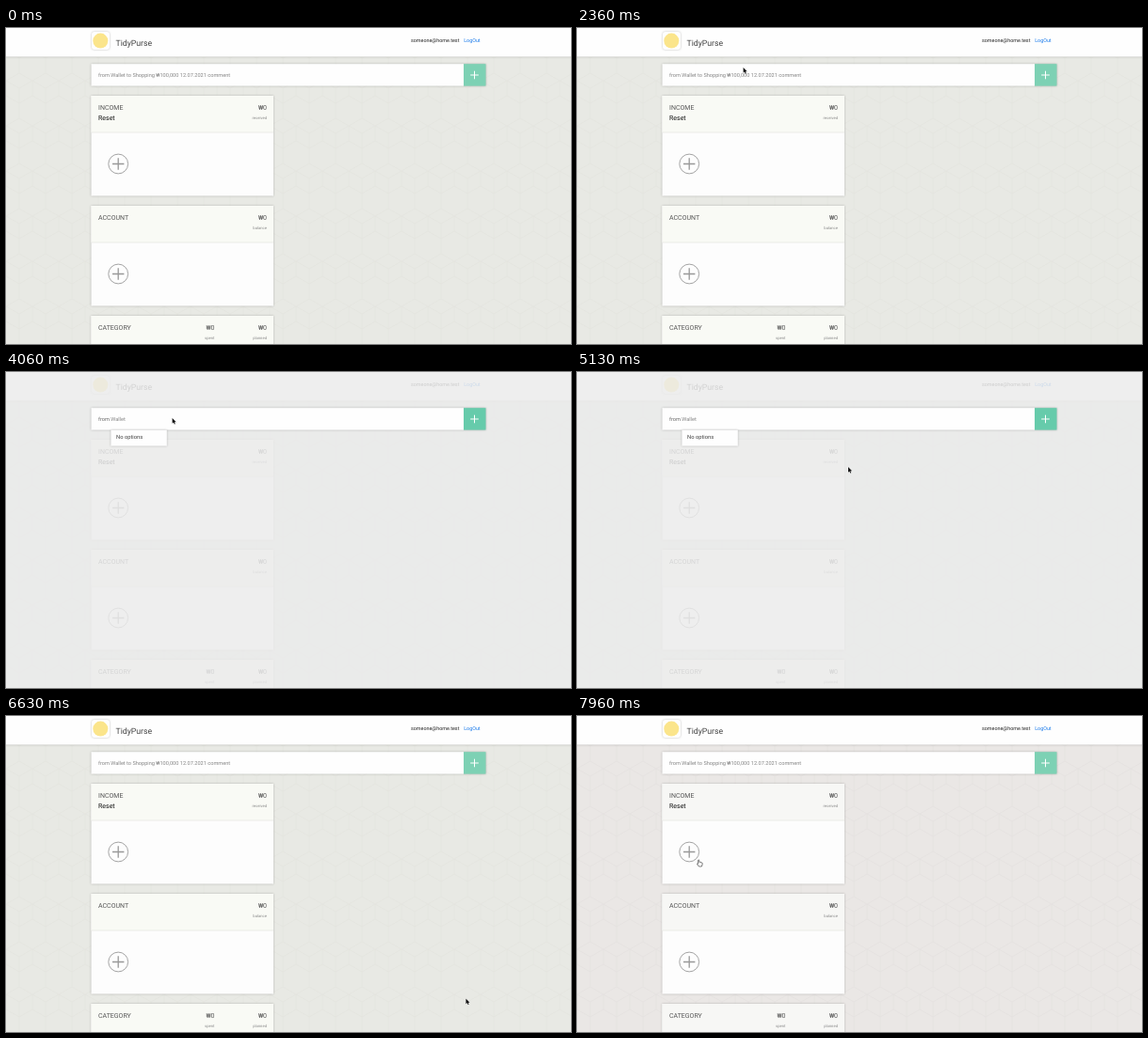
An HTML page that plays this animation: 600x336 px, repeating every 8000 ms.

```html
<!DOCTYPE html>
<html lang="en">
<head>
<meta charset="utf-8">
<title>Budget board</title>
<style>
  html, body { margin: 0; width: 100%; height: 100%; overflow: hidden; }
  svg { display: block; width: 600px; height: 336px; --page: #e8e9e4; --line: #e3e4de; --panel: #f9faf5; }
  svg.warm { --page: #eae7e5; --line: #e4e1df; --panel: #f7f7f5; }
  text { font-family: Roboto, Arial, sans-serif; text-rendering: geometricPrecision; }
  .page { fill: var(--page); }
  .weave { fill: none; stroke: var(--line); stroke-width: .8; }
  .panel { fill: var(--panel); }
  .shadow { filter: drop-shadow(0 .5px 1.3px rgba(0, 0, 0, .25)); }
  .head { font-size: 7px; fill: #555; }
  .note { font-size: 4.2px; fill: #8c8c8c; }
  .field { font-size: 5.6px; fill: #858585; }
  .end { text-anchor: end; }
</style>
</head>
<body>
<svg id="stage" viewBox="0 0 600 336">
  <defs>
    <pattern id="weave" width="28" height="48" patternUnits="userSpaceOnUse">
      <path class="weave" d="M0 8L14 0L28 8V24L14 32L0 24ZM14 32V48M0 8L14 16L28 8M14 16V32"/>
    </pattern>
  </defs>
  <rect class="page" width="600" height="336"/>
  <rect width="600" height="336" fill="url(#weave)"/>

  <g class="shadow">
    <rect x="-5" y="-5" width="610" height="35.5" fill="#fefefe"/>
  </g>
  <rect class="shadow" x="91" y="4" width="19" height="19" rx="3" fill="#fefefe"/>
  <circle cx="100.3" cy="13.6" r="8" fill="#fbe58b"/>
  <text x="116.5" y="18.6" font-size="8.7" fill="#444">TidyPurse</text>
  <text x="430" y="15.4" font-size="5.4" fill="#222">someone@home.test</text>
  <text x="486.2" y="15.4" font-size="5.4" fill="#1779ea">LogOut</text>

  <g id="cards"></g>
  <rect id="veil" width="600" height="336" fill="#ececec"/>

  <g class="shadow">
    <rect x="90.5" y="38.2" width="395.7" height="23.4" fill="#fefefe"/>
    <rect id="add" x="486" y="38.2" width="23.5" height="23.4"/>
  </g>
  <path d="M493.2 50H501.8M497.5 45.7V54.3" stroke="#fff" stroke-width="1"/>
  <text id="hint" class="field" x="98" y="51.6">from Wallet to Shopping ₩100,000 12.07.2021 comment</text>
  <g id="entry">
    <text class="field" x="98" y="52.2"><tspan fill="#666">from </tspan>Wallet</text>
    <g class="shadow"><rect x="111.4" y="61.6" width="59.4" height="17" fill="#fefefe"/></g>
    <text x="117" y="71.3" font-size="5.8" fill="#444">No options</text>
    <path id="caret" d="M112 47V54" stroke="#333" stroke-width=".6"/>
  </g>

  <g id="pointer" stroke-linejoin="round">
    <path id="arrow" d="M0 0V5.7L1.3 4.5L2.2 6.6L3.2 6.2L2.3 4.2H4.1Z" fill="#111" stroke="#fff" stroke-width=".5" paint-order="stroke"/>
    <path id="beam" d="M-1.3-3.8Q0-3.8 0-3V3Q0 3.8-1.3 3.8M1.3-3.8Q0-3.8 0-3M0 3Q0 3.8 1.3 3.8" fill="none" stroke="#333" stroke-width=".6"/>
    <path id="hand" d="M-.6 4.4V.5Q0-.4.6.5V2.6Q1.4 2 1.8 2.9Q2.6 2.4 2.9 3.2Q3.8 2.8 3.9 3.8V5.2L3.2 7.2H.2L-1.7 4.6Q-1.7 3.6-.6 4.4Z" fill="#fff" stroke="#333" stroke-width=".65"/>
  </g>
</svg>
<script>
const LOOP = 8000;
const $ = id => document.getElementById(id);

const label = (x, y, text, cls, extra = '') =>
  `<text class="${cls}" x="${x}" y="${y}" ${extra}>${text}</text>`;

function card(y, title, sums, sub = '') {
  const amounts = sums.map(([x, name]) =>
    label(x, y + 15.4, '₩0', 'head end') + label(x, y + 24.8, name, 'note end')).join('');
  return `<g class="shadow"><rect x="90.5" y="${y}" width="193.5" height="106.5" fill="#fdfdfd"/></g>
    <rect class="panel" x="90.5" y="${y}" width="193.5" height="39"/>
    <path d="M90.5 ${y + 39}h193.5" stroke="#e6e7e2" stroke-width=".8"/>
    ${label(98, y + 15.4, title, 'head')}${label(98, y + 26.2, sub, 'head', 'style="fill:#111"')}${amounts}
    <g fill="none" stroke="#999">
      <circle cx="119.2" cy="${y + 72.5}" r="10.4" stroke-width=".9"/>
      <path d="M113 ${y + 72.5}h12.4m-6.2-6.2v12.4" stroke-width="1.3"/>
    </g>`;
}

$('cards').innerHTML =
  card(72, 'INCOME', [[277, 'received']], 'Reset') +
  card(189, 'ACCOUNT', [[277, 'balance']]) +
  card(306, 'CATEGORY', [[221.5, 'spent'], [277, 'planned']]);

// time, x, y, pointer shape from then on
const path = [
  [0, 345, 304, ''], [100, 345, 304, 'arrow'], [170, 331, 280, 'arrow'], [230, 324.5, 264, 'arrow'],
  [830, 324.5, 264, 'arrow'], [960, 322, 252, 'arrow'], [1100, 319.3, 245, 'arrow'],
  [1460, 319, 245, 'arrow'], [1560, 275, 190, 'arrow'], [1640, 243, 152, 'arrow'], [1700, 235, 144, 'arrow'],
  [2000, 235, 144, 'arrow'], [2100, 218, 112, 'arrow'], [2240, 187, 58, 'arrow'],
  [2360, 176.6, 42, 'arrow'], [2450, 176.6, 46, 'beam'], [2760, 176.6, 48, 'beam'],
  [2830, 176.6, 48, 'beam'], [2930, 176.6, 49, 'beam'],
  [4060, 176.6, 49, 'arrow'], [4860, 176.6, 49, 'arrow'], [4950, 205, 64, 'arrow'],
  [5050, 268, 94, 'arrow'], [5130, 288, 101, 'arrow'],
  [5530, 288, 101, 'arrow'], [5620, 252, 114, 'arrow'], [5760, 168, 144, 'arrow'],
  [5900, 131.8, 151, 'arrow'], [5960, 126, 150, 'hand'], [6160, 111, 147, 'hand'],
  [6330, 111, 147, 'hand'], [6380, 135, 160, 'arrow'], [6500, 350, 255, 'arrow'],
  [6630, 488.4, 300.6, 'arrow'], [6780, 492, 285, 'arrow'], [6960, 494, 150, 'arrow'],
  [7130, 491, 47, 'hand'], [7230, 482, 37, 'arrow'], [7400, 410, 62, 'arrow'],
  [7620, 245, 122, 'arrow'], [7800, 146, 151, 'arrow'], [7850, 136, 153, 'arrow'],
  [7880, 130, 153, 'hand'], [7960, 129.2, 152.8, 'hand'], [LOOP, 129.2, 152.8, 'hand']
];

function pointerAt(t) {
  const i = path.findIndex((p, n) => n === path.length - 1 || t < path[n + 1][0]);
  const [t0, x0, y0, shape] = path[i];
  const [t1, x1, y1] = path[i + 1] || path[i];
  const k = t1 > t0 ? (t - t0) / (t1 - t0) : 0;
  return { x: x0 + (x1 - x0) * k, y: y0 + (y1 - y0) * k, shape };
}

const show = (id, on) => $(id).setAttribute('visibility', on ? 'visible' : 'hidden');

function draw(t) {
  const open = t >= 3560 && t < 5330;
  $('stage').classList.toggle('warm', t >= 7160);
  $('veil').setAttribute('opacity', !open ? 0 : t < 3600 ? .45 : .85);
  $('add').setAttribute('fill', open ? '#66cbab' : '#7dd1b4');
  show('hint', !open);
  show('entry', open);
  show('caret', open && Math.floor((t - 3560) / 500) % 2 === 0);

  const p = pointerAt(t);
  $('pointer').setAttribute('transform', `translate(${p.x} ${p.y})`);
  for (const id of ['arrow', 'beam', 'hand']) show(id, id === p.shape);
}

const start = performance.now();
function tick() {
  draw((performance.now() - start) % LOOP);
  requestAnimationFrame(tick);
}
tick();
</script>
</body>
</html>
```
